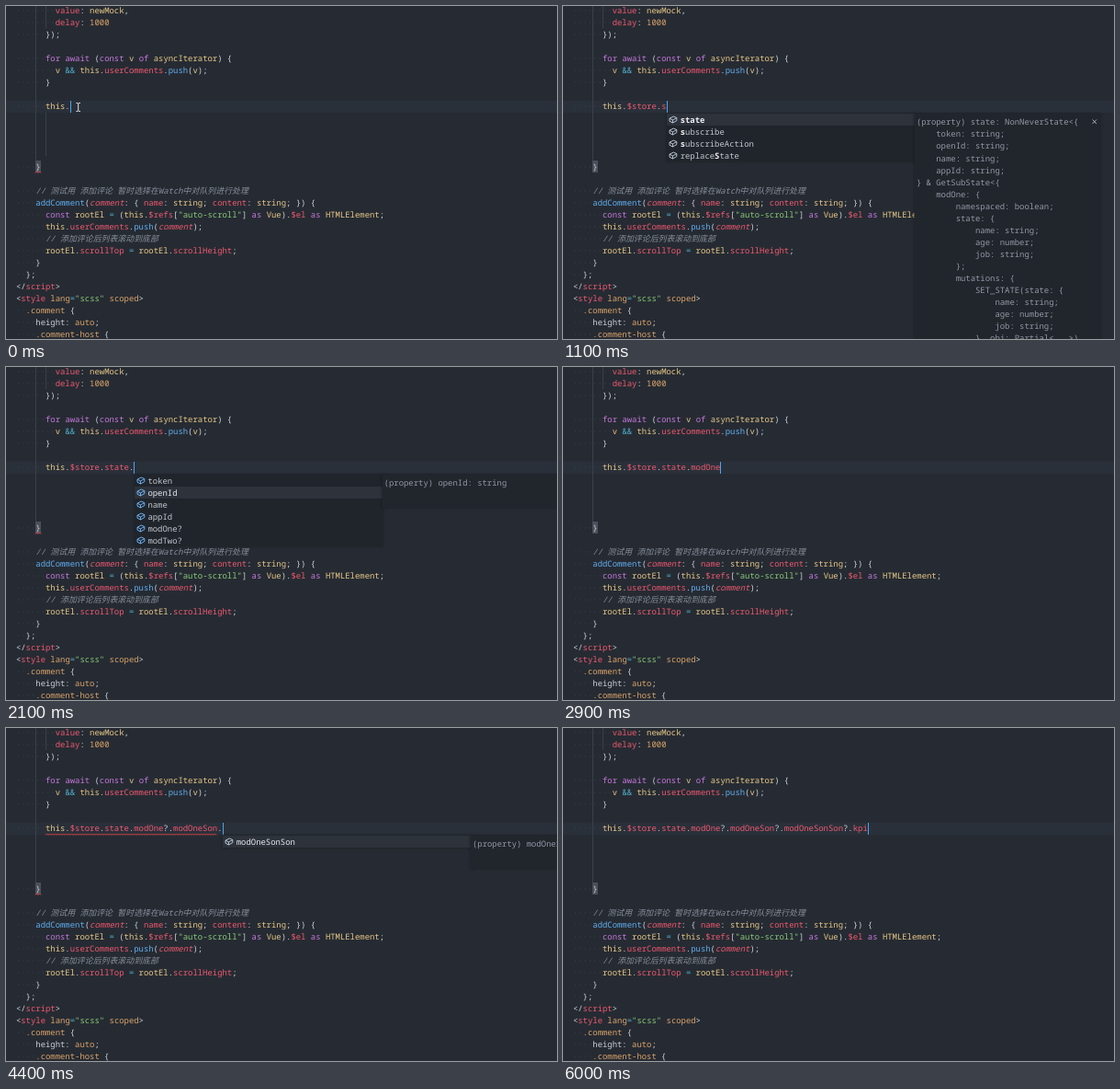
These frames come from a looping animation (600x362 px, 6100 ms). An HTML page:

```html
<!DOCTYPE html>
<html lang="en">
<head>
<meta charset="utf-8">
<title>Editor completion</title>
<style>
  html, body { margin: 0; width: 100%; height: 100%; overflow: hidden; background: #262b33; }
  #stage {
    position: relative; width: 600px; height: 362px; overflow: hidden; background: #262b33; color: #ccd1da;
    font: 500 8.92px/13.04px "Noto Sans Mono", "Noto Sans CJK SC", "Noto Sans CJK", monospace;
    font-variant-ligatures: none; text-rendering: geometricPrecision; white-space: pre;
  }
  #stage div, #stage svg { position: absolute; }
  #code { left: 0; top: 0; }
  .line { left: 10.9px; height: 13.04px; }
  .dots { color: #3b424d; }
  .guide { width: 1px; background: #3a404a; }
  #band { left: 0; right: 0; top: 103px; height: 13px; background: #2a303a; }
  #brace { left: 32px; top: 168px; width: 6px; height: 13px; background: #4a505a; }
  #caret { top: 103px; width: 1px; height: 13px; background: #4aa5f0; }
  #list { top: 117px; width: 270px; background: #20242b; box-shadow: 0 0 3px #181b20; }
  .row { left: 0; width: 270px; height: 13.04px; color: #c3c8d1; }
  .row.on { background: #2d323b; color: #e6e9ee; }
  .row b { color: #f0f2f5; }
  .row span { position: absolute; left: 14.8px; top: -.5px; }
  .row svg { left: 2.4px; top: 2px; }
  #info { top: 117px; width: 202px; background: #21252c; color: #9299a5; overflow: hidden; box-shadow: 0 0 3px #181b20; }
  #info div { left: 2px; top: 2.4px; }
  #info svg { left: 193px; top: 5.5px; }
  svg { overflow: visible; fill: none; }
</style>
</head>
<body>
<div id="stage">
  <div id="band"></div>
  <div class="guide" style="left:32px;top:0;height:168px"></div>
  <div class="guide" style="left:43px;top:0;height:24px"></div>
  <div class="guide" id="inner" style="left:43px;top:116px;height:47px"></div>
  <div id="brace"></div>
  <div id="code"></div>
  <div class="line" id="typed"></div>
  <svg width="600" height="362" style="left:0;top:0">
    <path id="wave" stroke="#e5484d" stroke-width=".9"/>
    <path id="braceWave" stroke="#e5484d" stroke-width=".9"/>
    <path id="mouse" stroke="#e4e6ea" d="M76.5 105.5h1.5l.7.7.7-.7h1.5M78.7 106v8M76.5 114.5h1.5l.7-.7.7.7h1.5"/>
  </svg>
  <div id="caret"></div>
  <div id="list"></div>
  <div id="info"></div>
</div>
<script>
const LOOP = 6100, CHAR = 5.352, STEP = 13.04, LEFT = 43;
const $ = id => document.getElementById(id);

const source = `        value: newMock,
        delay: 1000
      });

      for await (const v of asyncIterator) {
        v && this.userComments.push(v);
      }






    }

    // 测试用 添加评论 暂时选择在Watch中对队列进行处理
    addComment(comment: { name: string; content: string; }) {
      const rootEl = (this.$refs["auto-scroll"] as Vue).$el as HTMLElement;
      this.userComments.push(comment);
      // 添加评论后列表滚动到底部
      rootEl.scrollTop = rootEl.scrollHeight;
    }
  };
<\/script>
<style lang="scss" scoped>
  .comment {
    height: auto;
    .comment-host {`;

const RED = '#ef596f';
const palette = {
  '#c678dd': 'for await const of as',
  '#e9c987': 'newMock v asyncIterator this string rootEl Vue HTMLElement',
  '#61afef': 'push addComment',
  '#dca56a': '1000 lang scoped auto',
  '#4fb0cc': '&& =',
  '#ccd1da': 'height'
};
const colors = {};
for (const c in palette) for (const w of palette[c].split(' ')) colors[w] = c;

const esc = s => s.replace(/&/g, '&amp;').replace(/</g, '&lt;');
const paint = (s, color, extra = '') => `<span style="color:${color};${extra}">${esc(s)}</span>`;

function colorOf(token) {
  if (token.startsWith('//')) return ['#878e9a', 'font-style:italic'];
  if (token[0] === '"') return ['#89ca78'];
  if (token[0] === '.') return ['#dca56a'];
  return [colors[token] || RED, token === 'comment' ? 'font-style:italic' : ''];
}

function highlight(text) {
  const indent = text.match(/^ */)[0].length;
  const rest = text.slice(indent);
  let html = `<span class="dots">${'·'.repeat(indent)}</span>`, at = 0;
  for (const m of rest.matchAll(/\/\/.*|"[^"]*"|^\.[\w-]+|[\w$]+|&&|=/g)) {
    html += esc(rest.slice(at, m.index)) + paint(m[0], ...colorOf(m[0]));
    at = m.index + m[0].length;
  }
  return html + esc(rest.slice(at));
}

const lineTop = n => -2 + STEP * n;
$('code').innerHTML = source.split('\n').map((text, n) =>
  `<div class="line" style="top:${lineTop(n)}px">${highlight(text)}</div>`).join('');
$('typed').style.top = lineTop(8) + 'px';

function zigzag(x0, x1, y) {
  let d = `M${x0} ${y}`;
  for (let x = x0 + 1.5, i = 1; x <= x1; x += 1.5, i++) d += `L${x} ${y - (i % 2) * 1.6}`;
  return d;
}
$('braceWave').setAttribute('d', zigzag(32, 38, 181.5));

const stateInfo = `(property) state: NonNeverState<{
    token: string;
    openId: string;
    name: string;
    appId: string;
} & GetSubState<{
    modOne: {
        namespaced: boolean;
        state: {
            name: string;
            age: number;
            job: string;
        };
        mutations: {
            SET_STATE(state: {
                name: string;
                age: number;
                job: string;
            }, obj: Partial<...>)`;

const prop = (name, type) => `(property) ${name}: ${type}`;
const fields = ['token', 'openId', 'name', 'appId', 'modOne?', 'modTwo?'];
const stores = ['[state]', '[s]ubscribe', '[s]ubscribeAction', 'replace[S]tate'];
const root = 'this.$store.state', one = root + '.modOne';
const son = one + '?.modOneSon', grandson = son + '?.modOneSonSon';

const pick = sel => ({ items: fields, sel, info: prop(fields[sel], 'string'), tint: '#75beff' });
const only = name => ({ items: [name], sel: 0, info: prop(name, 'number') });

// time, typed text, underlined columns, unfinished expression, completion list
const steps = [
  [0, 'this.', 0, 1],
  [300, 'this.$', 0, 0],
  [400, 'this.$s', 0, 0],
  [500, 'this.$st', 0, 0],
  [600, 'this.$store', 0, 0],
  [900, 'this.$store.', 0, 1],
  [1000, 'this.$store.s', 0, 0],
  [1100, 'this.$store.s', 0, 0, { items: stores, sel: 0, info: stateInfo }],
  [1400, root, 0, 0],
  [1700, root + '.', 0, 1],
  [1800, root + '.', 0, 1, pick(0)],
  [2100, root + '.', 0, 1, pick(1)],
  [2200, root + '.', 0, 1, pick(2)],
  [2300, root + '.', 0, 1, pick(3)],
  [2400, root + '.', 0, 1, pick(4)],
  [2700, one, 0, 0],
  [3100, one + '.', 24, 1],
  [3200, one + '.', 24, 1, only('modOneSon')],
  [3600, son, 24, 1],
  [3900, son, 0, 0],
  [4100, son + '.', 35, 1, only('modOneSonSon')],
  [4500, grandson, 35, 1],
  [4700, grandson, 0, 0],
  [4900, grandson + '.', 49, 1],
  [5000, grandson + '.', 49, 1, only('kpi')],
  [5500, grandson + '?.kpi', 49, 1],
  [5800, grandson + '?.kpi', 0, 0]
];

const cube = tint => `<svg width="10" height="9" stroke="${tint}" stroke-width=".9">
<path d="M1 3.2L5.4 1 8.8 2.6V5.6L4.4 8 1 6.2ZM1 3.2L4.4 4.9 8.8 2.6M4.4 4.9V8"/></svg>`;
const close = '<svg width="6" height="6" stroke="#b6bdc9" stroke-width=".9"><path d="M.5.5L5 5M5 .5L.5 5"/></svg>';

function showPopup(popup, x) {
  const list = $('list'), info = $('info');
  list.hidden = info.hidden = !popup;
  if (!popup) return;
  const { items, sel, tint = '#c3d2de' } = popup;
  list.style.left = x + .3 + 'px';
  list.style.height = items.length * STEP + 'px';
  list.innerHTML = items.map((name, i) =>
    `<div class="row${i === sel ? ' on' : ''}" style="top:${i * STEP}px">${cube(tint)}<span>${
      name.replace('[', '<b>').replace(']', '</b>')}</span></div>`).join('');
  const long = popup.info.includes('\n');
  info.style.left = x + 270.3 + 'px';
  info.style.height = long ? '250px' : '36px';
  info.innerHTML = `<div>${esc(popup.info)}</div>` + (long ? close : '');
}

function show(i) {
  const [, text, errors, unfinished, popup] = steps[i];
  const x = LEFT + text.length * CHAR;
  $('typed').innerHTML = highlight('      ' + text);
  $('caret').style.left = x + 'px';
  $('wave').setAttribute('d', errors ? zigzag(LEFT, LEFT + errors * CHAR, 116.5) : '');
  $('braceWave').style.display = unfinished ? '' : 'none';
  $('mouse').style.display = $('inner').style.display = i ? 'none' : '';
  showPopup(popup, x);
}

const start = performance.now();
let shown = -1;
function tick() {
  const t = (performance.now() - start) % LOOP;
  const i = steps.filter(s => s[0] <= t).length - 1;
  if (i !== shown) show(shown = i);
  requestAnimationFrame(tick);
}
tick();
</script>
</body>
</html>
```
